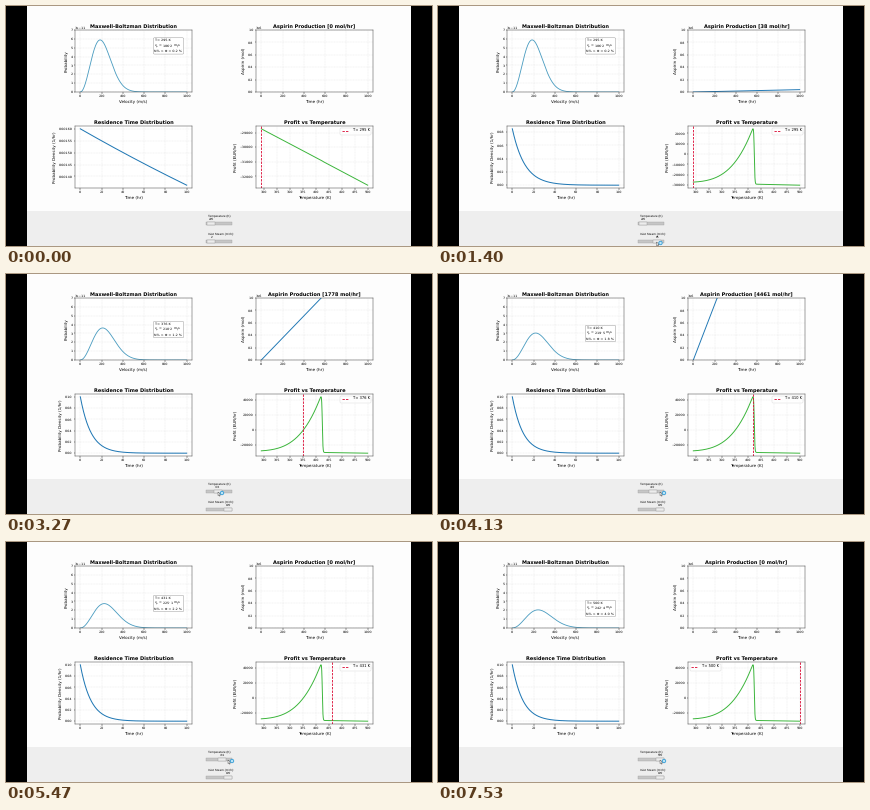
Write a matplotlib script that moves like this. It is 426 px wide and 240 px high and loops after 7.59 s.

```python
import numpy as np
import matplotlib.pyplot as plt
from matplotlib.animation import FuncAnimation
from matplotlib.patches import Circle, Polygon, Rectangle
from matplotlib.ticker import MaxNLocator

W, H = 426, 240
FRAMES, STEP = 115, 66  # 7590 ms loop

plt.rcParams.update({
    "font.family": "DejaVu Sans", "font.size": 3.4, "text.hinting": "none",
    "axes.titlesize": 5.05, "axes.titleweight": "bold", "axes.titlepad": 2,
    "axes.labelsize": 4.17, "axes.linewidth": 0.45, "axes.edgecolor": "#333333",
    "xtick.labelsize": 3.35, "ytick.labelsize": 3.35,
    "xtick.major.size": 1.5, "ytick.major.size": 1.5,
    "xtick.major.pad": 1.2, "ytick.major.pad": 1.0,
    "xtick.major.width": 0.4, "ytick.major.width": 0.4,
    "axes.grid": True, "grid.color": "#b0b0b0", "grid.alpha": 0.45,
    "grid.linewidth": 0.3, "grid.linestyle": "--", "axes.axisbelow": True,
})

# Timelines: (ms, value)
FLOW = [(0, 0.016), (792, 0.4), (1584, 1.0)]
TEMP = [(2310, 295), (3234, 376), (4092, 410), (4800, 417.5), (5412, 431), (7524, 500)]
MOUSE_X = [(0, 203), (66, 203), (792, 211), (1584, 221), (1800, 220), (2310, 209),
           (2376, 206), (3234, 212), (3760, 217), (4026, 222)]
MOUSE_Y = [(0, 242), (66, 236), (1600, 236), (2310, 220), (2376, 218)]


def at(t, keys):
    return np.interp(t, *zip(*keys))


def production(temp, flow):
    """Aspirin output in mol/hr, collapsing above the decomposition point."""
    u = 1 / 295 - 1 / temp
    rise = 52 * np.exp(5258 * u - 605000 * u ** 2)
    return 1.015 * flow ** 2 * rise / (1 + np.exp((temp - 412.5) / 0.6))


def profit(temp, flow):
    knots = [0.016, 0.4, 1]
    base = np.interp(flow, knots, [-28730, -26500, -28260])
    slope = np.interp(flow, knots, [18.9, 12.7, 11])
    return base - slope * (temp - 295) + 16.6 * production(temp, flow)


def mean_speed(temp):
    return np.sqrt(8 * 8.314 * temp / (np.pi * 0.18016))


def speed_peak(temp):
    return 5.88e-11 * (295 / temp) ** 2


def speed_density(v, temp):
    r = (v / mean_speed(temp)) ** 2
    return speed_peak(temp) * r * np.exp(1 - r)


def fit_y(ax, y):
    pad = 0.05 * (y.max() - y.min())
    ax.set_ylim(y.min() - pad, y.max() + pad)


fig = plt.figure(figsize=(W / 72, H / 72), dpi=72, facecolor="#fdfdfd")


def plot_axes(left, top, title, xlabel, ylabel, xlim, xstep):
    ax = fig.add_axes([left / W, 1 - (top + 62) / H, 117 / W, 62 / H])
    ax.set_title(title)
    ax.set_xlabel(xlabel, labelpad=2)
    ax.set_ylabel(ylabel, labelpad=2.7)
    lo, hi = xlim
    pad = 0.05 * (hi - lo)
    ax.set_xlim(lo - pad, hi + pad)
    ax.set_xticks(np.arange(np.ceil(lo / xstep) * xstep, hi + 1, xstep))
    ax.yaxis.set_major_locator(MaxNLocator(8, steps=[1, 2, 2.5, 5, 10]))
    ax.yaxis.OFFSETTEXTPAD = 1.5
    return ax


speed_ax = plot_axes(69, 24, "Maxwell-Boltzman Distribution", "Velocity (m/s)",
                     "Probability", (0, 1000), 200)
prod_ax = plot_axes(250, 24, "", "Time (hr)", "Aspirin (mol)", (0, 1000), 200)
rtd_ax = plot_axes(69, 120, "Residence Time Distribution", "Time (hr)",
                   "Probability Density (1/hr)", (0, 100), 20)
profit_ax = plot_axes(250, 120, "Profit vs Temperature", "Temperature (K)",
                      "Profit (EUR/hr)", (295, 500), 25)
speed_ax.set_ylim(0, 7e-11)
prod_ax.set_ylim(0, 1e6)

v = np.linspace(0, 1000, 300)
hours = np.linspace(0, 100, 200)
kelvin = np.linspace(295, 500, 700)
speed_line, = speed_ax.plot(v, 0 * v, color="#4a9cc0", lw=0.85)
prod_line, = prod_ax.plot(v, 0 * v, color="#1f77b4", lw=0.95)
rtd_line, = rtd_ax.plot(hours, 0 * hours, color="#1f77b4", lw=1)
profit_line, = profit_ax.plot(kelvin, 0 * kelvin, color="#38b438", lw=0.95)
mark = profit_ax.axvline(295, color="#dc143c", lw=0.9, ls=(0, (2.6, 1.3)), label="T = 295 K")
legend = profit_ax.legend(loc="upper right", fontsize=3.6, framealpha=0.8,
                          edgecolor="#cccccc")
legend.get_frame().set_linewidth(0.4)

# Overlay in stage pixels
ui = fig.add_axes([0, 0, 1, 1], zorder=5)
ui.set(xlim=(0, W), ylim=(H, 0))
ui.axis("off")


def box(x, y, w, h, color, **kw):
    return ui.add_patch(Rectangle((x, y), w, h, facecolor=color, **kw))


box(21, 205, 384, 35, "#eeeeee", lw=0)
box(0, 0, 21, H, "black", lw=0)
box(405, 0, 21, H, "black", lw=0)

info = ui.text(148.5, 40, "", fontsize=3.35, va="center", linespacing=1.15,
               bbox=dict(boxstyle="round,pad=0.35", fc="white", ec="#888888", lw=0.4))


def slider(y, name):
    ui.text(201.5, y, name, fontsize=3.15, family="Liberation Sans", va="center")
    value = ui.text(205, y + 4, "", fontsize=3.1, family="Liberation Sans",
                    ha="center", va="center")
    box(200, y + 6.6, 26, 3.4, "#c6c6c6", ec="#9a9a9a", lw=0.35)
    knob = box(201, y + 6.9, 8, 2.8, "#ececec", ec="#8a8a8a", lw=0.35)
    return value, knob


def set_slider(parts, frac, number):
    value, knob = parts
    x = 205 + 17 * frac
    value.set_x(x)
    value.set_text(f"{number:.0f}")
    knob.set_x(x - 4)


temp_slider = slider(209.3, "Temperature (K)")
flow_slider = slider(227.3, "Inlet Steam (m³/h):")

ARROW = np.array([(0, 0), (0, 3.6), (0.9, 2.8), (1.6, 4.2), (2.2, 3.9), (1.6, 2.6), (2.7, 2.5)])
arrow = ui.add_patch(Polygon(ARROW, fc="white", ec="black", lw=0.3))
ring = ui.add_patch(Circle((0, 0), 1.7, fc="#bfe6f7", ec="#3aa0d8", lw=0.9))


def draw(i):
    t = i * STEP
    temp, flow = at(t, TEMP), at(t, FLOW)
    rate = production(temp, flow)

    speed_line.set_ydata(speed_density(v, temp))
    prod_line.set_ydata(rate * v)
    prod_ax.set_title(f"Aspirin Production [{rate:.0f} mol/hr]")

    density = flow / 10 * np.exp(-hours * flow / 10)
    rtd_line.set_ydata(density)
    fit_y(rtd_ax, density)

    gain = profit(kelvin, flow)
    profit_line.set_ydata(gain)
    fit_y(profit_ax, gain)

    mark.set_xdata([temp, temp])
    legend.get_texts()[0].set_text(f"T = {temp:.0f} K")
    legend.set_loc("upper left" if temp > 448 else "upper right")

    share = np.interp(temp, [295, 376, 410, 431, 500], [0.2, 1.2, 1.8, 2.2, 4.0])
    info.set_text(f"T = {temp:.0f} K\n$v_p$ = {mean_speed(temp):.1f} m/s\n"
                  f"N% > Φ = {share:.1f} %")
    peak_y = 86 - 62 * speed_peak(temp) / 7e-11
    info.set_y(40 + 0.78 * (peak_y - 34))

    set_slider(temp_slider, (temp - 295) / 205, temp)
    set_slider(flow_slider, flow, 100 * flow)

    x, y = at(t, MOUSE_X), at(t, MOUSE_Y)
    arrow.set_xy(ARROW + (x, y))
    ring.center = (x + 4, y + 1)
    ring.set_visible(not 1584 < t < 2376)


anim = FuncAnimation(fig, draw, frames=FRAMES, interval=STEP, repeat=True,
                     repeat_delay=0, blit=False)
plt.show()
```
